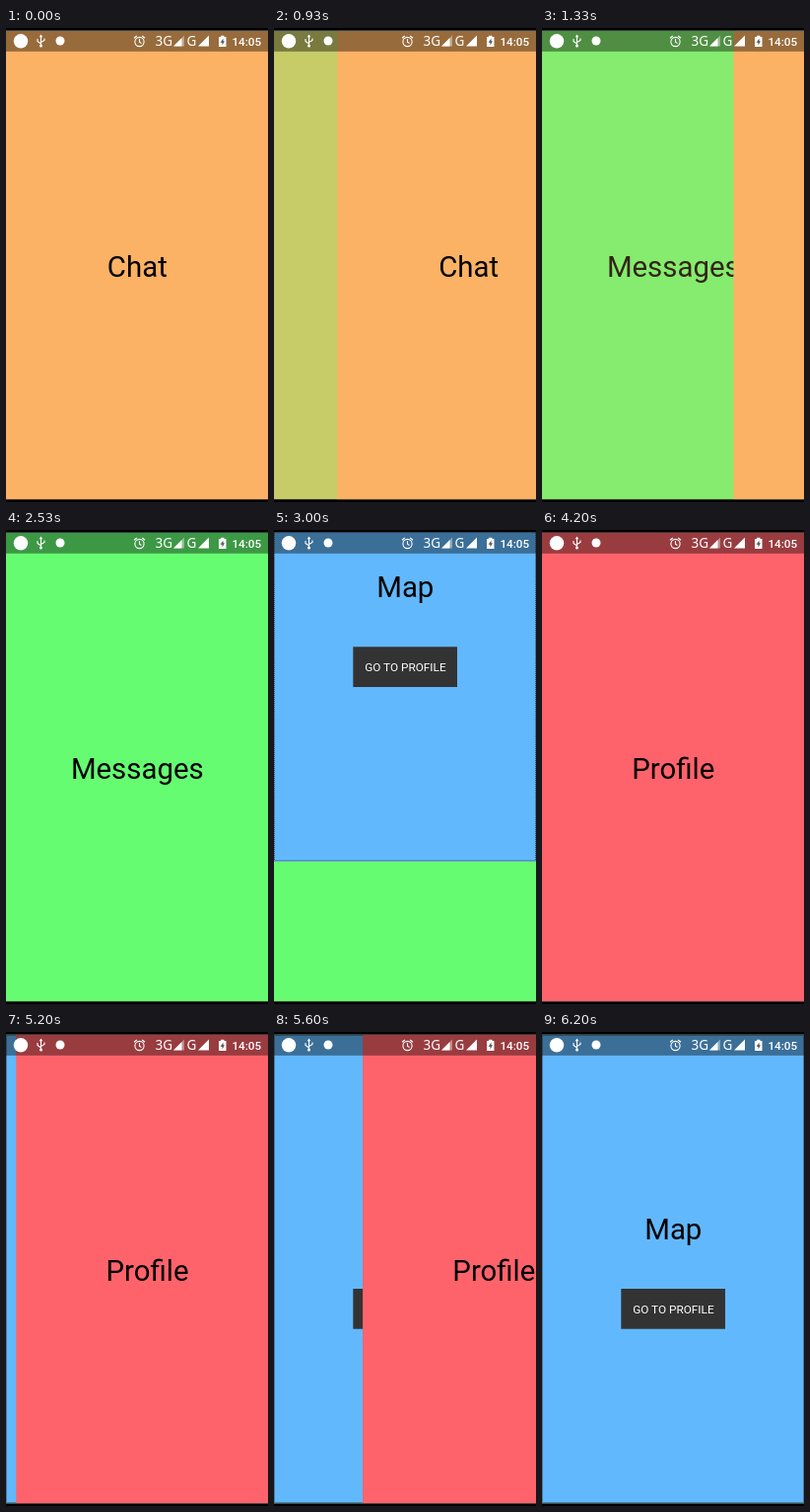
Recreate the animation shown at these times as an HTML page. Size 266 by 480 pixels, loop 6.34 s.

```html
<!DOCTYPE html>
<html lang="en">
<head>
<meta charset="utf-8">
<title>Screen transitions</title>
<style>
  html, body { margin: 0; height: 100%; overflow: hidden; background: #000; }
  svg { display: block; width: 100%; height: 100%; }
  text { font-family: Roboto, sans-serif; text-anchor: middle; }
  .title { font-size: 29.4px; }
  .button { font-size: 11.8px; fill: #fff; }
  .net { font-family: "Noto Sans", sans-serif; font-size: 13.5px; }
  .clock { font-size: 11.7px; font-weight: 500; }
  .page { y: 2.5px; width: 266px; height: 475px; }
</style>
</head>
<body>
<svg viewBox="0 0 266 480">
  <rect class="page" fill="#fcb264"/>
  <g id="messages">
    <rect class="page" fill="#66fc72"/>
    <text class="title" x="133.3" y="252">Messages</text>
  </g>
  <g id="chat">
    <rect class="page" fill="#fcb264"/>
    <text class="title" x="133.3" y="252">Chat</text>
  </g>
  <g id="map">
    <rect class="page" fill="#62b8fc"/>
    <rect x=".5" y="3.5" width="265" height="473" fill="none" stroke="#444" stroke-dasharray="1"/>
    <text class="title" x="133.3" y="210">Map</text>
    <rect x="80.3" y="260" width="105.7" height="40.7" fill="#333"/>
    <text class="button" x="133.4" y="285.2">GO TO PROFILE</text>
  </g>
  <g id="profile">
    <rect class="page" fill="#fe636b"/>
    <text class="title" x="133.3" y="252">Profile</text>
  </g>

  <!-- phone frame and status bar -->
  <path d="M0 0H266V2.5H0zM0 477.5H266V480H0z"/>
  <rect y="2.5" width="266" height="21.3" opacity=".4"/>
  <g fill="#fff">
    <circle cx="15" cy="13.3" r="7.2"/>
    <circle cx="55" cy="13" r="4.5"/>
    <g fill="none" stroke="#fff" stroke-width="1.1">
      <path d="M35.5 8V18M32 11V13.5L35.5 16M39 10.5V12.5L35.5 14.5"/>
      <circle cx="135.5" cy="14" r="4.6"/>
      <path d="M135.5 11V14.2L137.5 15.5M130 10.2L132.8 8M141 10.2L138.2 8"/>
    </g>
    <path d="M35.5 6.5l1.8 2.7h-3.6z"/>
    <circle cx="35.5" cy="18" r="1.5"/>
    <text class="net" x="160.2" y="18.3">3G</text>
    <path d="M181 7.5V18.5H170z" opacity=".4"/>
    <path d="M178.5 10V18.5H170z"/>
    <text class="net" x="188.3" y="18.3">G</text>
    <path d="M206 7.5V18.5H195z"/>
    <path d="M216 9h2V7.7h3.5V9h2V19H216z"/>
    <path d="M220.5 10.5L217.7 14.7H219.5V17.5L222 13.2H220.5z" fill="#555"/>
    <text class="clock" x="244.3" y="17.7">14:05</text>
  </g>
</svg>
<script>
const LOOP = 6340, W = 266, H = 475;
const el = id => document.getElementById(id);
const move = (id, x, y) => el(id).setAttribute("transform", `translate(${x} ${y})`);

const part = (t, from, to) => Math.min(1, Math.max(0, (t - from) / (to - from)));
const smooth = u => u * u * (3 - 2 * u);
const settle = u => 1 - (1 - u) ** 3;

// A finger drags the screen by a share of its size, then it glides the rest
const swipe = (t, from, release, end, share) =>
  share * smooth(part(t, from, release)) + (1 - share) * settle(part(t, release, end));

const start = performance.now();
function draw(now) {
  const t = Math.max(0, now - start) % LOOP;
  const chat = swipe(t, 680, 1330, 1800, .729);
  const map = swipe(t, 2540, 3000, 3530, .7);
  const push = smooth(part(t, 3935, 4200));
  const back = swipe(t, 5070, 5730, 6200, .376);

  el("messages").setAttribute("opacity", chat ** .75);
  move("chat", W * chat, 0);
  move("map", 0, H * (map - 1));
  move("profile", W * (1 - push + back), 0);
  requestAnimationFrame(draw);
}
draw(start);
</script>
</body>
</html>
```
